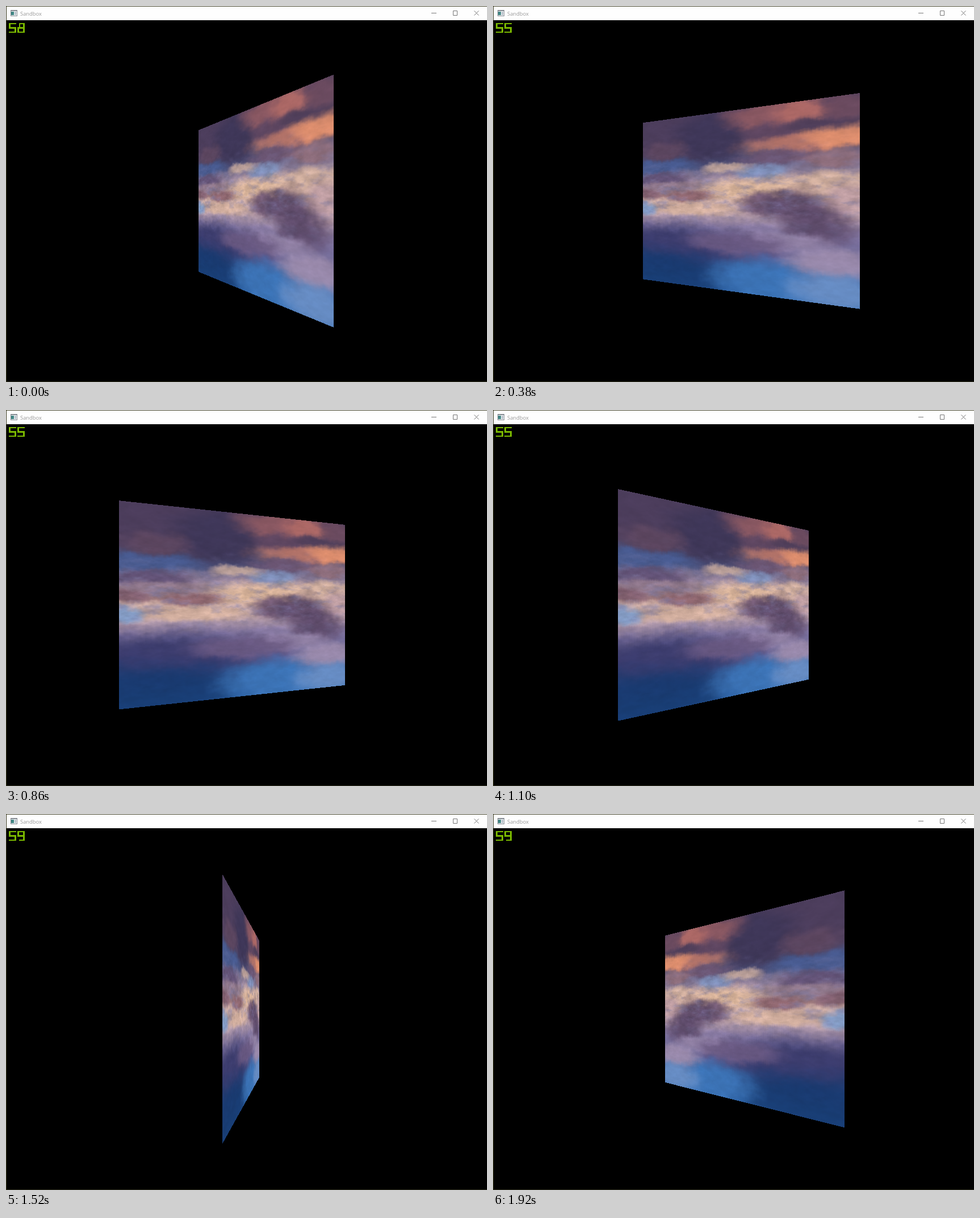
These frames come from a looping animation (847 px wide and 661 px high, 2.02 s). An HTML page with a canvas:

```html
<!DOCTYPE html>
<html lang="en">
<head>
<meta charset="utf-8">
<title>Sandbox</title>
<style>
html, body { margin: 0; width: 100%; height: 100%; overflow: hidden; background: #000; }
canvas { display: block; }
</style>
</head>
<body>
<canvas id="stage" width="847" height="661"></canvas>
<script>
const ctx = document.getElementById('stage').getContext('2d');
const TW = 426, TH = 319;               // size of the picture seen face on
const CX = 424.2, CY = 342.8;           // centre of rotation
const DEPTH = 0.3297;                   // half width / camera distance
const LOOP = 2020, STEPS = 45;

const lerp = (a, b, t) => a + (b - a) * t;
const clamp = v => Math.max(0, Math.min(1, v));
const smooth = v => v * v * (3 - 2 * v);
const rgb = hex => [1, 3, 5].map(i => parseInt(hex.substr(i, 2), 16));

function track(points, x) {
  let i = 1;
  while (i < points.length - 1 && x > points[i][0]) i++;
  const [x0, a] = points[i - 1], [x1, b] = points[i];
  const t = clamp((x - x0) / (x1 - x0));
  return Array.isArray(a) ? a.map((v, k) => lerp(v, b[k], t)) : lerp(a, b, t);
}

function mix(col, other, t) {
  for (let k = 0; k < 3; k++) col[k] = lerp(col[k], other[k], t);
}

// --- sky ---
const GRADIENT = [
  [0, '#4a3c5a'], [60, '#54455f'], [90, '#4f5580'], [115, '#94829a'], [150, '#ccaa9c'],
  [185, '#ac95a4'], [207, '#8678a0'], [245, '#5d5c90'], [280, '#34619f'], [319, '#2f6ab0']
].map(([y, c]) => [y, rgb(c)]);
const HAZE = rgb('#7c7aa6');

// x, y, radius x, radius y, colour
const CLOUDS = [
  [60, 40, 115, 48, '#4c3d5c'],
  [165, 45, 80, 48, '#3d3658'],
  [55, 62, 48, 18, '#5d465f'],
  [280, 14, 85, 24, '#8f5a62'],
  [335, 14, 50, 15, '#b06a66'],
  [408, 16, 34, 22, '#6e4c60'],
  [280, 46, 50, 14, '#604762'],
  [365, 40, 55, 9, '#4e3d58'],
  [345, 66, 110, 15, '#ba7668'],
  [405, 61, 60, 17, '#e4926f'],
  [300, 87, 80, 12, '#6c5470'],
  [390, 93, 58, 15, '#93707c'],
  [40, 92, 90, 14, '#465a90'],
  [35, 116, 75, 13, '#5d4d72'],
  [60, 132, 85, 11, '#8b7487'],
  [200, 100, 45, 9, '#c4a79c'],
  [270, 110, 48, 12, '#7d90ba'],
  [260, 138, 105, 19, '#dcb69a'],
  [385, 128, 65, 15, '#d0ae9c'],
  [12, 146, 45, 12, '#7c5a6c'],
  [110, 149, 52, 11, '#875f6a'],
  [125, 172, 105, 13, '#d4b09e'],
  [10, 175, 26, 12, '#7b98c4'],
  [410, 160, 34, 26, '#bf9ea4'],
  [268, 164, 46, 17, '#6c5470'],
  [322, 167, 56, 27, '#5b4767'],
  [362, 200, 54, 29, '#5b4868'],
  [300, 225, 75, 14, '#9786aa'],
  [60, 250, 150, 46, '#37386a'],
  [30, 302, 185, 46, '#16396f'],
  [205, 232, 95, 17, '#6a5982'],
  [385, 255, 80, 24, '#a08eae'],
  [265, 294, 95, 32, '#3d75b8'],
  [390, 300, 75, 28, '#6c90c6']
].map(([x, y, rx, ry, c]) => ({ x, y, rx, ry, c: rgb(c) }));

function hash(x, y) {
  let h = Math.imul(x, 374761393) + Math.imul(y, 668265263);
  h = Math.imul(h ^ (h >>> 13), 1274126177);
  return ((h ^ (h >>> 16)) >>> 0) / 4294967296;
}

function noise(x, y) {
  const i = Math.floor(x), j = Math.floor(y), u = smooth(x - i), v = smooth(y - j);
  return lerp(lerp(hash(i, j), hash(i + 1, j), u), lerp(hash(i, j + 1), hash(i + 1, j + 1), u), v);
}

function fbm(x, y) {
  let sum = 0;
  for (let o = 0, amp = 0.55; o < 4; o++, amp *= 0.6, x *= 2, y *= 2)
    sum += amp * (noise(x + o * 17, y + o * 31) - 0.5);
  return sum;
}

function paintSky() {
  const c = document.createElement('canvas');
  c.width = TW;
  c.height = TH;
  const g = c.getContext('2d'), img = g.createImageData(TW, TH);
  for (let y = 0, p = 0; y < TH; y++) {
    for (let x = 0; x < TW; x++, p += 4) {
      const wx = x + 26 * fbm(x / 32, y / 18);
      const wy = y + 14 * fbm(x / 34 + 40, y / 16 + 9);
      const col = track(GRADIENT, wy);
      for (const b of CLOUDS) {
        const dx = (wx - b.x) / b.rx, dy = (wy - b.y) / b.ry, d = dx * dx + dy * dy;
        if (d < 2.1) mix(col, b.c, 0.9 * smooth(clamp((1.45 - Math.sqrt(d)) / 0.95)));
      }
      // thin haze and streaks, strongest in the bright middle band
      const band = Math.exp(-(((y - 148) / 60) ** 2));
      mix(col, HAZE, band * clamp(1.3 * fbm(x / 26 + 11, y / 9 + 60)));
      const light = 1 + (0.1 + 0.2 * band) * fbm(x / 20 + 80, y / 8 + 5);
      for (let k = 0; k < 3; k++) img.data[p + k] = col[k] * light;
      img.data[p + 3] = 255;
    }
  }
  g.putImageData(img, 0, 0);
  return c;
}

// --- timing ---
const LONG = [2, 4, 6, 11, 13, 16, 19, 22, 26, 29, 31, 33, 39, 44];
const ANGLES = [[0, 59], [7, 29], [14, -1.1], [23, -41.3], [29, -67.9], [36, -101.2], [44, -134.5]];

function stepAt(t) {
  let i = 0;
  while (i < STEPS - 1) {
    t -= LONG.includes(i) ? 100 : 20;
    if (t < 0) break;
    i++;
  }
  return i;
}

// --- drawing ---
function drawPlane(sky, angle) {
  const c = Math.cos(angle), s = Math.sin(angle) * DEPTH, w = TW / 2;
  const edge = u => CX + w * u * c / (1 - u * s);
  const ends = [edge(-1), edge(1)];
  const left = Math.round(Math.min(...ends)), right = Math.round(Math.max(...ends));
  for (let x = left; x < right; x++) {
    const sx = x + 0.5 - CX;
    const u = Math.max(-1, Math.min(1, sx / (w * c + s * sx)));
    const half = TH / 2 / (1 - u * s);
    const top = Math.round(CY - half), bottom = Math.round(CY + half);
    const col = Math.min(TW - 1, (u + 1) * w);
    ctx.drawImage(sky, col, 0, 1, TH, x, top, 1, bottom - top);
  }
}

const GLYPHS = {
  5: '##### #.... #.... ##### ....# ....# #####',
  8: '.#### .#..# .#..# ##### #...# #...# #####',
  9: '##### #...# #...# ##### ....# ....# .####'
};

function rect(color, x, y, w, h) {
  ctx.fillStyle = color;
  ctx.fillRect(x, y, w, h);
}

function drawCounter(text) {
  const px = i => Math.round(i * 2.6), py = j => Math.round(j * 2.45);
  [...text].forEach((ch, n) => GLYPHS[ch].split(' ').forEach((row, j) => {
    [...row].forEach((dot, i) => {
      if (dot === '#')
        rect('#7ab800', 5 + n * 15 + px(i), 30 + py(j), px(i + 1) - px(i), py(j + 1) - py(j));
    });
  }));
}

function drawWindow() {
  rect('#000', 0, 0, 847, 661);
  rect('#fefefe', 0, 0, 847, 25);
  rect('#4c4c34', 0, 0, 847, 1);
  rect('#36361c', 0, 0, 1, 661);
  rect('#2c2c1c', 0, 660, 847, 1);

  rect('#858b92', 8, 7, 12, 11);
  rect('#f4f6f8', 9, 9, 10, 8);
  rect('#3f8583', 9, 10, 5, 6);
  rect('#b9c3cc', 15, 10, 3, 6);

  ctx.fillStyle = '#999';
  ctx.font = '9.4px "Open Sans", "Noto Sans", sans-serif';
  ctx.fillText('Sandbox', 25, 16.5);

  ctx.strokeStyle = '#777';
  ctx.lineWidth = 1;
  ctx.beginPath();
  ctx.moveTo(749, 12.5);
  ctx.lineTo(758, 12.5);
  ctx.rect(787.5, 8.5, 7, 8);
  ctx.moveTo(824.5, 8.5);
  ctx.lineTo(832.5, 16.5);
  ctx.moveTo(832.5, 8.5);
  ctx.lineTo(824.5, 16.5);
  ctx.stroke();
}

const sky = paintSky();
const start = performance.now();
let shown = -1;

function render(now) {
  const step = stepAt(Math.max(0, now - start) % LOOP);
  if (step !== shown) {
    shown = step;
    drawWindow();
    drawPlane(sky, track(ANGLES, step) * Math.PI / 180);
    drawCounter(step < 4 ? '58' : step < 27 ? '55' : '59');
  }
  requestAnimationFrame(render);
}
render(start);
</script>
</body>
</html>
```
